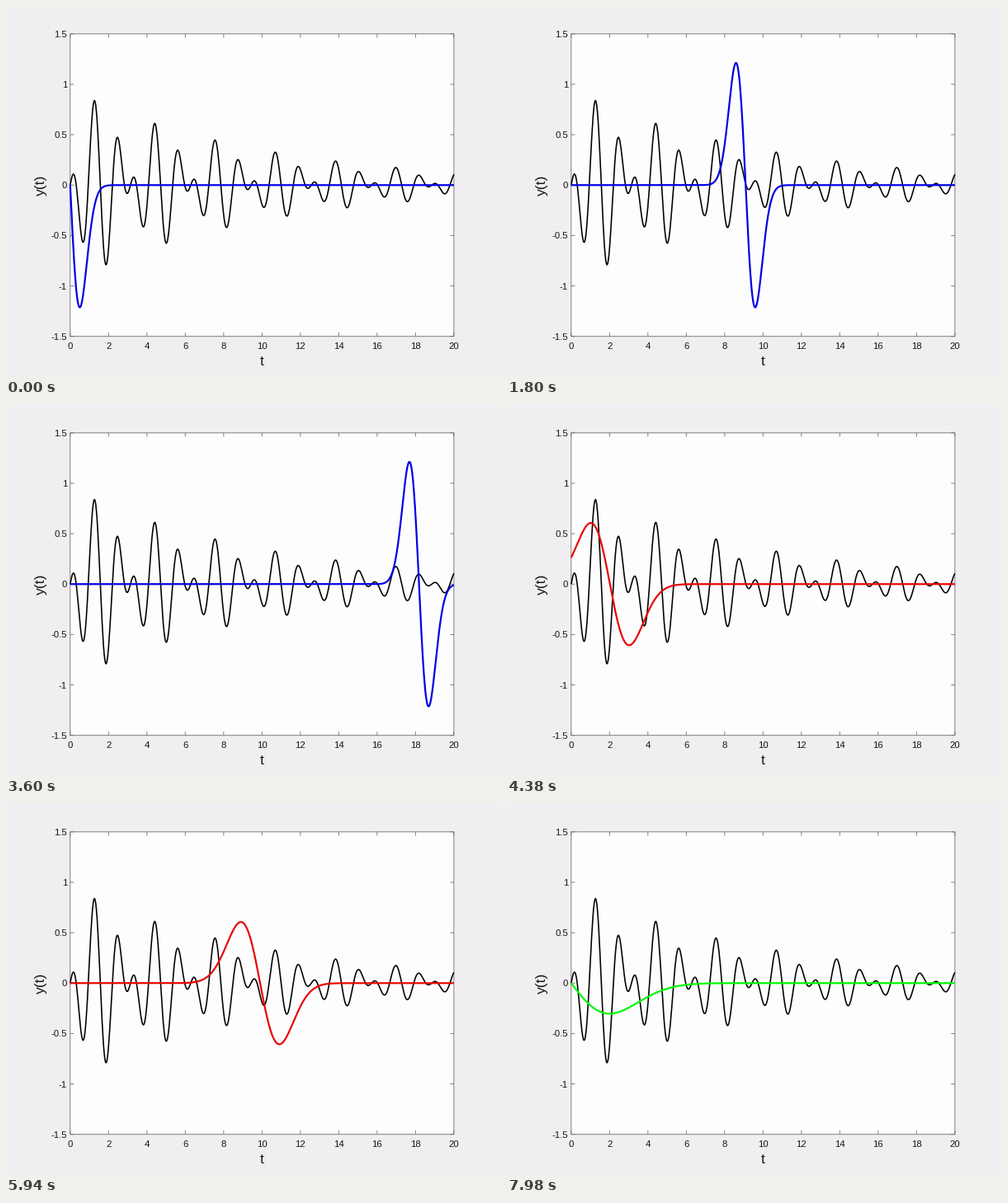
A matplotlib script that plays this animation: 600x450 px, repeating every 8000 ms.

```python
import math

import matplotlib.pyplot as plt
import numpy as np
from matplotlib.animation import FuncAnimation
from matplotlib.collections import LineCollection
from matplotlib.patches import Rectangle

W, H, DPI = 600, 450, 100
PT = 72 / DPI                       # points per pixel
TICK_MS, HOLD, LOOP_MS = 20, 3, 8000

LEFT, RIGHT, TOP, BOTTOM = 77.8, 542.9, 33.8, 400.7
T_MAX, Y_MAX = 20, 1.5
INK, FRAME = "#161616", "#747474"

# Each wavelet (scale, colour) slides across the plot in evenly spaced shifts.
WAVELETS = [(0.5, "#0000e4"), (1.0, "#e80400"), (2.0, "#00f800")]
SHIFTS = np.linspace(0, T_MAX, 100)
SHIFTS_PER_POSE = 1.5


def px(t):
    return LEFT + (RIGHT - LEFT) * t / T_MAX


def py(y):
    return (TOP + BOTTOM) / 2 - (BOTTOM - TOP) / 2 * y / Y_MAX


def signal(t):
    return np.exp(-0.1 * t) * np.cos(5 * t) * np.sin(t)


def wavelet(t, scale, shift):
    u = (t - shift) / scale
    return -u * np.exp(-u * u / 2) / scale


plt.rcParams["font.family"] = "Liberation Sans"
fig = plt.figure(figsize=(W / DPI, H / DPI), dpi=DPI, facecolor="#f0eef0")
ax = fig.add_axes([0, 0, 1, 1])
ax.set_xlim(0, W)
ax.set_ylim(H, 0)
ax.axis("off")


def label(x, y, text, size=11.4, **kw):
    ax.text(x, y, text, fontsize=size * PT, color=INK, **kw)


ax.add_patch(Rectangle((LEFT, TOP), RIGHT - LEFT, BOTTOM - TOP,
                       facecolor="#fefdfe", edgecolor=FRAME,
                       linewidth=0.9 * PT, snap=False, zorder=1))

ticks = []
for t in range(0, T_MAX + 1, 2):
    x = px(t)
    ticks += [[(x, BOTTOM), (x, BOTTOM - 4.6)], [(x, TOP), (x, TOP + 4.6)]]
    label(x, 416, str(t), ha="center", va="baseline")
for y in np.arange(-Y_MAX, Y_MAX + 0.1, 0.5):
    v = py(y)
    ticks += [[(LEFT, v), (LEFT + 4.6, v)], [(RIGHT, v), (RIGHT - 4.6, v)]]
    label(74, v + 4, f"{y:g}", ha="right", va="baseline")
ax.add_collection(LineCollection(ticks, colors=FRAME, linewidths=0.9 * PT,
                                 snap=False, zorder=2))

label(310.3, 436, "t", 17.5, ha="center", va="baseline")
label(42, 216.8, "y(t)", 17.5, ha="center", va="center", rotation=90)

time = np.linspace(0, T_MAX, 601)
xs = px(time)
ax.plot(xs, py(signal(time)), color="black", linewidth=1.6 * PT,
        solid_capstyle="butt", zorder=3)
curve, = ax.plot([], [], linewidth=2.2 * PT, solid_capstyle="butt", zorder=4)


def draw(i):
    step = math.ceil(i // HOLD * SHIFTS_PER_POSE)
    which, n = divmod(step, len(SHIFTS))
    scale, colour = WAVELETS[which]
    curve.set_data(xs, py(wavelet(time, scale, SHIFTS[n])))
    curve.set_color(colour)
    return curve,


anim = FuncAnimation(fig, draw, frames=LOOP_MS // TICK_MS, interval=TICK_MS,
                     repeat=True, repeat_delay=0, blit=False)
plt.show()
```
